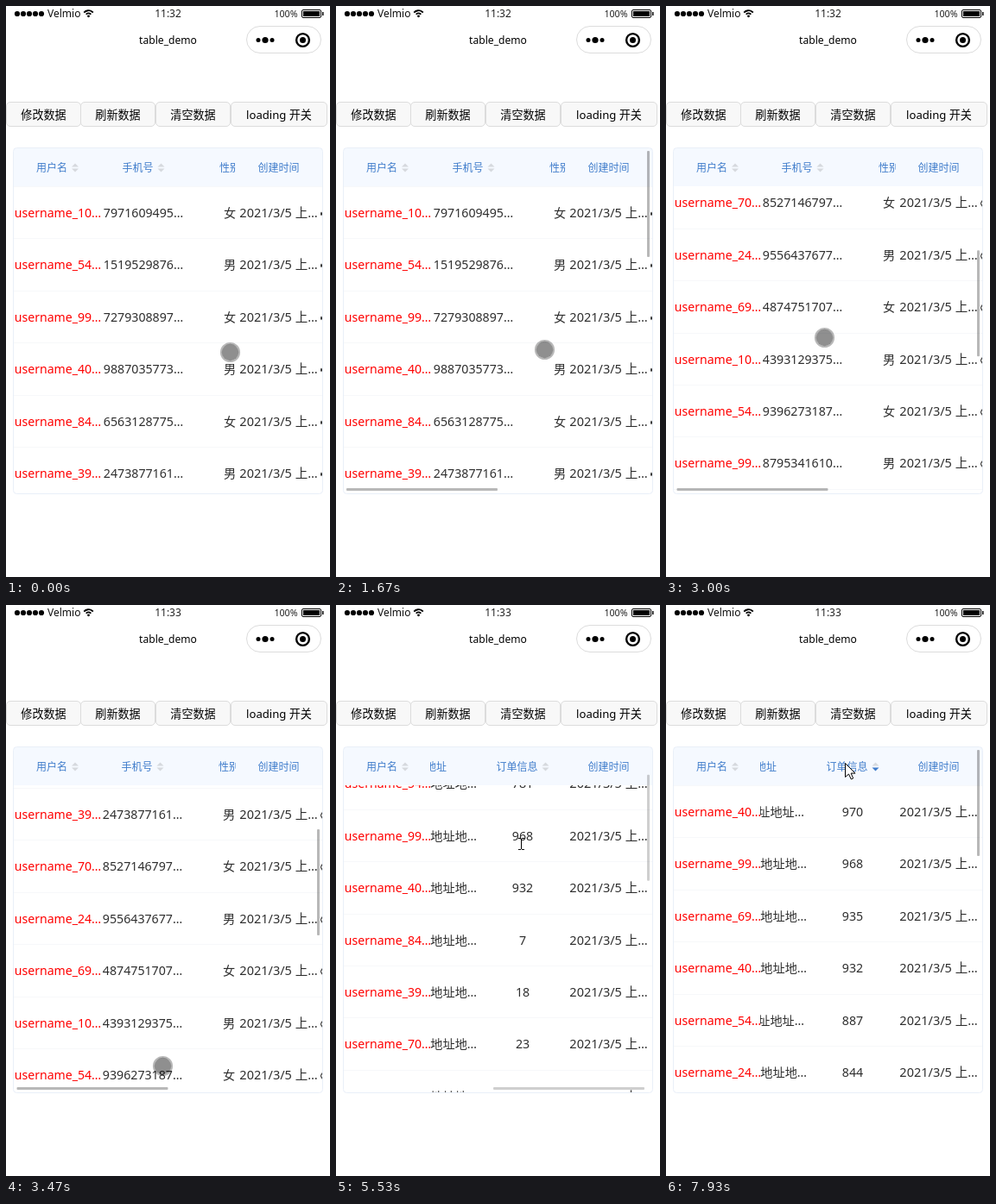
Recreate the animation shown at these times as an HTML page with a canvas. Size 375 px wide and 662 px high, loop 8 s.

```html
<!DOCTYPE html>
<html lang="zh-CN">
<head>
<meta charset="utf-8">
<title>table_demo</title>
<style>
html, body { margin: 0; width: 100%; height: 100%; overflow: hidden; background: #fff; }
canvas { display: block; width: 375px; height: 662px; }
</style>
</head>
<body>
<canvas id="stage"></canvas>
<script>
const LOOP = 8000, STEP = 1000 / 15;
const W = 375, H = 662;
const FAMILY = '"Noto Sans", "Noto Sans CJK SC", "Noto Sans CJK", sans-serif';
const BLUE = '#3f7ccb', INK = '#2e2e2e';
const TOP = 209, ROW = 60.4, COL = 100, LEFT = 9, MAX_X = 343;
const CLOCK = 3330, MOUSE = 5330, ARROW = 6200, PRESS_1 = 6660, SORT_UP = 6865, RETURN = 7325, PRESS_2 = 7725, SORT_DOWN = 7865;

const canvas = document.getElementById('stage');
const ctx = canvas.getContext('2d');
const ratio = window.devicePixelRatio || 1;
canvas.width = W * ratio;
canvas.height = H * ratio;

// Table data
const firstOrders = [412, 781, 968, 932, 7, 18, 23, 844, 935, 306, 887, 153, 970];
const rows = Array.from({ length: 20 }, (_, i) => {
  const id = `${1 + i * 4 % 9}${'049'[i % 3]}`;
  const order = firstOrders[i] ?? 60 + i * 37;
  const phone = Math.floor(1e9 + 8.9e9 * Math.abs(Math.sin(i * 2.3 + 0.9)));
  return {
    name: `username_${id}…`,
    order,
    cells: [
      `${phone}…`,
      i % 2 ? '男' : '女',
      `mailbox_${id}…`,
      `${i}:地址地址地`.slice(0, 7 - (i < 10 ? 0 : 0)).slice(0, i < 10 ? 7 : 7) + '…',
      `${order}`
    ]
  };
});
const ascending = [...rows].sort((a, b) => a.order - b.order);
const descending = [...ascending].reverse();
const heads = [['手机号', true], ['性别'], ['邮箱'], ['地址'], ['订单信息', true]];

// Each move adds its offsets between start and end: [start, end, ...offsets]
const pointerMoves = [
  [70, 330, -32, -15], [470, 900, -218, 6], [1000, 1600, 232, 6], [1700, 2130, -47, 77],
  [2200, 2645, -5, -295], [2700, 3150, -8, 275], [3229, 3723, 0, 168], [3740, 3960, 37, -239],
  [4000, 4400, -200, -4], [4400, 4730, 88, 0], [4800, 5000, 193, -5], [5000, 5250, -220, -30],
  [5270, 5400, 134, -68], [5900, 6400, -5, -94], [7460, 7530, -2, 0]
];
const scrollXMoves = [
  [470, 900, 218], [1000, 1500, -218], [2130, 2200, 1],
  [4000, 4400, 200], [4400, 4730, -88], [5000, 5270, 230]
];
const scrollYMoves = [[2200, 2745, 374], [3229, 3930, -281], [5670, 6000, -93]];
const barXSpans = [[470, 5400]];
const barYSpans = [[470, 5400], [5670, 5930], [SORT_UP, LOOP]];

const clamp = k => Math.max(0, Math.min(1, k));
const ease = k => k * k * (3 - 2 * k);
const travel = (moves, t, axis = 0) => Math.round(moves.reduce(
  (sum, [start, end, ...offsets]) => sum + offsets[axis] * ease(clamp((t - start) / (end - start))), 0));
const barAlpha = (spans, t) => Math.max(...spans.map(
  ([start, end]) => t < start - 5 ? 0 : 0.28 * clamp(1 - (t - end) / 400)));

// Drawing helpers
function text(str, x, y, size, color, align = 'center') {
  ctx.font = `${size}px ${FAMILY}`;
  ctx.textAlign = align;
  ctx.fillStyle = color;
  ctx.fillText(str, x, y);
}
function rect(x, y, w, h, color) {
  ctx.fillStyle = color;
  ctx.fillRect(x, y, w, h);
}
function box(x, y, w, h, r, fill, stroke) {
  ctx.beginPath();
  ctx.roundRect(x, y, w, h, r);
  if (fill) { ctx.fillStyle = fill; ctx.fill(); }
  if (stroke) { ctx.strokeStyle = stroke; ctx.lineWidth = 1; ctx.stroke(); }
}
function disc(x, y, r, color) {
  ctx.beginPath();
  ctx.arc(x, y, r, 0, Math.PI * 2);
  ctx.fillStyle = color;
  ctx.fill();
}
function ring(x, y, r, width, color, from = 0, to = Math.PI * 2) {
  ctx.beginPath();
  ctx.arc(x, y, r, from, to);
  ctx.strokeStyle = color;
  ctx.lineWidth = width;
  ctx.stroke();
}
function poly(points, fill) {
  ctx.beginPath();
  points.forEach(([x, y]) => ctx.lineTo(x, y));
  ctx.closePath();
  ctx.fillStyle = fill;
  ctx.fill();
}
function clipped(x, y, w, h, draw) {
  ctx.save();
  ctx.beginPath();
  ctx.rect(x, y, w, h);
  ctx.clip();
  draw();
  ctx.restore();
}

function drawChrome(t) {
  for (let i = 0; i < 5; i++) disc(13 + i * 7, 9, 3.1, '#000');
  text('Velmio', 48, 12.5, 12, '#111', 'left');
  for (const r of [3.6, 6.8]) ring(95.5, 12, r, 1.8, '#000', -Math.PI * 0.78, -Math.PI * 0.22);
  disc(95.5, 11.8, 1.4, '#000');
  text(t < CLOCK ? '11:32' : '11:33', 187.5, 12.5, 12, '#222');
  text('100%', 324, 12.5, 10.7, '#222');
  box(342.5, 4.5, 22, 9, 1.5, null, '#000');
  rect(344, 6, 19, 6, '#000');
  rect(366, 7, 1.5, 4, '#000');

  text('table_demo', 187.5, 44, 12.1, '#000');
  box(278.5, 23.5, 86, 31, 15.5, '#fff', '#dcdcdc');
  for (const i of [-1, 0, 1]) disc(300 + i * 8, 39.5, i ? 2.5 : 3.6, '#000');
  ring(343.5, 39.5, 7.4, 2.4, '#000');
  disc(343.5, 39.5, 3.5, '#000');

  ['修改数据', '刷新数据', '清空数据', 'loading 开关'].forEach((label, i) => {
    const x = Math.floor(i * 86.9), w = i < 3 ? 87 : 112;
    box(x + 0.5, 111.5, w - 1, 28, 4.5, '#f8f8f8', '#dcdcdc');
    text(label, x + w / 2, 130.5, 13.1, '#000');
  });
}

function drawHead(label, center, sortable, active) {
  text(label, center - (sortable ? 6.5 : 0), 192, 12, BLUE);
  if (!sortable) return;
  const x = center + label.length * 6 + 2.5;
  const shade = dir => active === dir ? BLUE : '#d6d9de';
  poly([[x - 4, 186.5], [x, 182.5], [x + 4, 186.5]], shade('up'));
  poly([[x - 4, 188.5], [x, 192.5], [x + 4, 188.5]], shade('down'));
}

function drawTable(t) {
  const dx = travel(scrollXMoves, t), dy = travel(scrollYMoves, t);
  const [list, direction] = t >= SORT_DOWN ? [descending, 'down']
    : t >= SORT_UP ? [ascending, 'up'] : [rows, ''];
  const pressed = (t >= PRESS_1 && t < SORT_UP) || (t >= PRESS_2 && t < SORT_DOWN);
  const center = i => LEFT + COL * (i + 0.5) - dx;

  clipped(LEFT, TOP, 357, 356, () => {
    list.forEach((row, i) => {
      const y = Math.round(TOP + i * ROW - dy), base = y + 36;
      row.cells.forEach((cell, c) => text(cell, center(c + 1), base, 14.2, INK));
      rect(LEFT, y, COL, ROW, '#fff');
      rect(266, y, 98, ROW, '#fff');
      text(row.name, LEFT + 51, base, 14.1, '#f00');
      text('2021/3/5 上…', 315.5, base, 14.5, INK);
      rect(LEFT, y, 357, 1, '#f7f8fa');
    });
  });

  rect(LEFT, 165, 357, TOP - 165, '#f5f9ff');
  clipped(109, 165, 157, 44, () => heads.forEach(([label, sortable], i) => {
    ctx.globalAlpha = pressed && i === 4 ? 0.7 : 1;
    drawHead(label, center(i + 1), sortable, i === 4 ? direction : '');
  }));
  drawHead('用户名', 59.5, true, '');
  drawHead('创建时间', 315.5, false, '');
  box(8.5, 164.5, 358, 401, 4, null, '#e9eff8');

  box(360, 168 + dy * 0.308, 3, 123, 1, `rgba(0,0,0,${barAlpha(barYSpans, t)})`);
  box(12 + dx * 170 / MAX_X, 559, 175, 3, 1, `rgba(0,0,0,${barAlpha(barXSpans, t)})`);
}

function drawPointer(t) {
  const x = 260 + travel(pointerMoves, t, 0), y = 401 + travel(pointerMoves, t, 1);
  if (t < MOUSE) {
    disc(x - 0.5, y + 0.5, 9.7, 'rgba(0,0,0,.44)');
    ring(x - 0.5, y + 0.5, 10.6, 2, 'rgba(0,0,0,.28)');
  } else if (t < ARROW) {
    rect(x, y - 6, 1, 12, '#000');
    for (const edge of [-7, 6]) {
      rect(x - 3, y + edge, 3, 1, '#000');
      rect(x + 1, y + edge, 3, 1, '#000');
    }
  } else if (t < SORT_UP || t >= RETURN) {
    const shape = [[0, 0], [0, 16], [4, 12.5], [6.8, 18.5], [9.2, 17.4], [6.6, 11.6], [11.5, 11.6]];
    poly(shape.map(([px, py]) => [x + 0.5 + px, y + 0.5 + py]), '#fff');
    ctx.strokeStyle = '#000';
    ctx.lineWidth = 1;
    ctx.stroke();
  }
}

function render(now) {
  const t = Math.floor((now % LOOP + 5) / STEP) * STEP % LOOP;
  ctx.setTransform(ratio, 0, 0, ratio, 0, 0);
  rect(0, 0, W, H, '#fff');
  drawChrome(t);
  drawTable(t);
  drawPointer(t);
}

let start;
function tick(now) {
  start ??= now;
  render(now - start);
  requestAnimationFrame(tick);
}
render(0);
requestAnimationFrame(tick);
</script>
</body>
</html>
```
